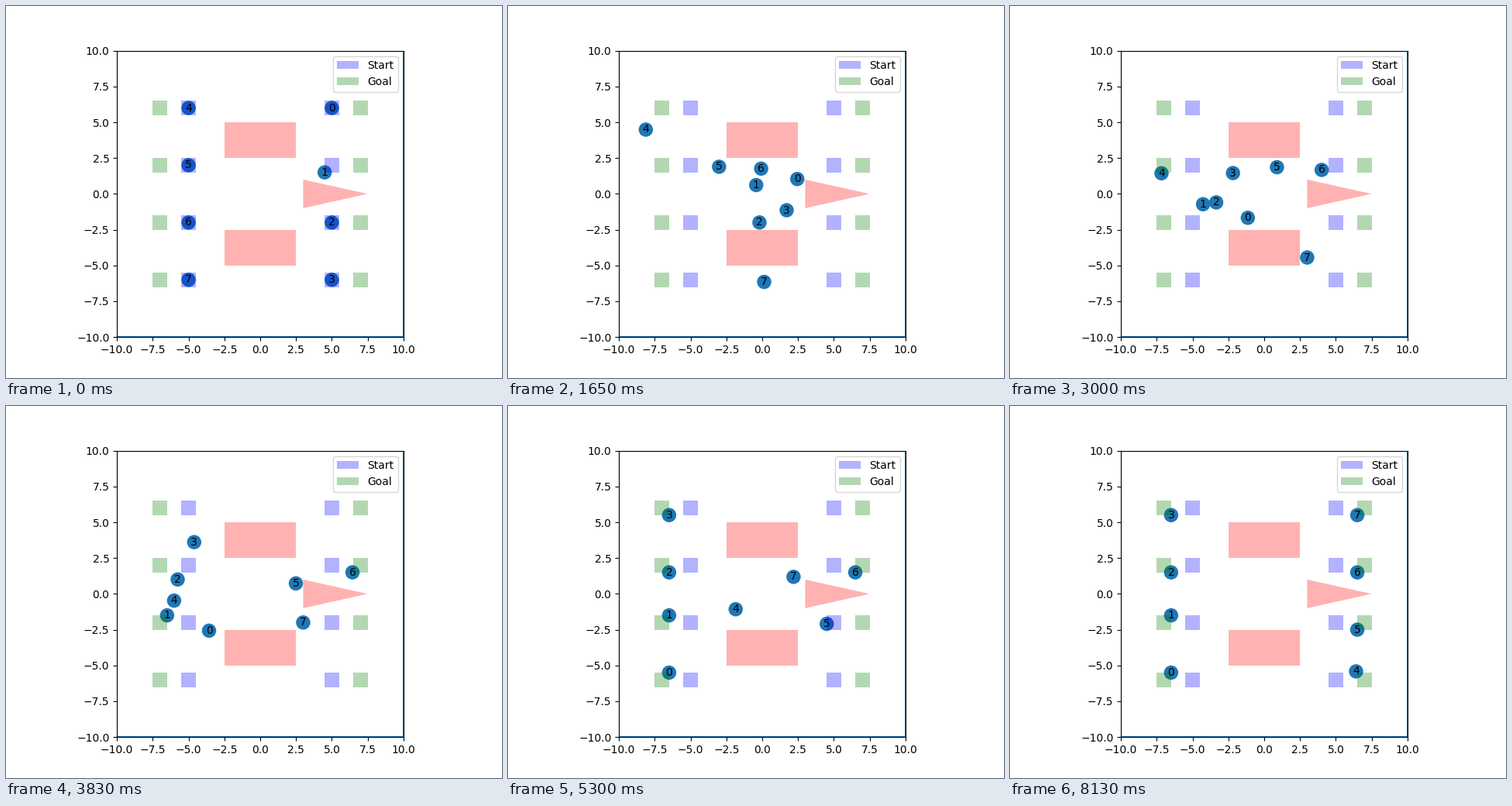
Write a matplotlib script that moves like this. It is 640x480 px and loops after 8.16 s.

```python
import numpy as np
import matplotlib.pyplot as plt
from matplotlib.animation import FuncAnimation
from matplotlib.patches import Circle, Polygon, Rectangle

LOOP_MS = 8160
FRAMES = 326
CRUISE = 0.0713  # units per step along the longer axis
ROWS = 6, 2, -2, -6

# Turning points between start and goal: (step, x, y).
TURNS = [
    [(66, 2.41, .96), (103, 0, -1.47), (145, -3, -2)],
    [(25, 2.4, 1.58), (66, -.49, .59)],
    [(66, -.27, -2), (120, -3.41, -.57)],
    [(10, 5.97, -4.9), (33, 4.01, -2.68), (130.4, -3, 2)],
    [(73, -8.51, 4.3), (149, -6.3, -.43), (275, 2.74, -1.74),
     (276, 2.74, -1.74), (296.6, 4.47, -3.46)],
    [(66, -2.98, 1.89), (138, 2.28, 1.85), (153, 2.49, .73),
     (183, 2.51, -1.69)],
    [(66, 0, 1.82), (120, 4.09, 1.67)],
    [(8.5, -3.98, -7.08), (104.3, 3, -5.5), (153, 3, -2),
     (187.6, .52, -.48)],
]
STARTS = [(x, y) for x in (5, -5) for y in ROWS]
STARTS[1] = 4.5, 1.5
GOALS = [(-6.5, y) for y in (-5.5, -1.5, 1.5, 5.5)]
GOALS += [(6.5, y) for y in (-5.5, -2.5, 1.5, 5.5)]


def make_path(start, turns, goal):
    """Steps, xs and ys of a path; the last leg runs at cruise speed."""
    t, x, y = turns[-1]
    arrival = t + max(abs(goal[0] - x), abs(goal[1] - y)) / CRUISE
    return np.array([(0, *start), *turns, (arrival, *goal)]).T


paths = [make_path(*parts) for parts in zip(STARTS, TURNS, GOALS)]

fig, ax = plt.subplots(figsize=(6.4, 4.8), dpi=100)
ax.set_aspect("equal")
ax.plot([-10, 10, 10, -10, -10], [-10, -10, 10, 10, -10], color="C0")
ax.set(xlim=(-10, 10), ylim=(-10, 10))


def tint(patch, color, label=None):
    patch.set(facecolor=color, edgecolor="none", alpha=0.3, label=label)
    return ax.add_patch(patch)


def squares(x, color, label):
    """Unit squares at (+-x, y) in every row."""
    for side in (-x, x):
        for y in ROWS:
            mark = tint(Rectangle((side - .5, y - .5), 1, 1), color, label)
    return mark


for y in (2.5, -5):
    tint(Rectangle((-2.5, y), 5, 2.5), "red")
tint(Polygon([(3, 1), (3, -1), (7.5, 0)]), "red")
marks = [squares(5, "blue", "Start"), squares(7, "green", "Goal")]
ax.legend(handles=marks, loc="upper right")

discs = [ax.add_patch(Circle((0, 0), 0.5, facecolor="C0", edgecolor="none",
                             zorder=0.5)) for _ in paths]
names = [ax.text(0, 0, str(i), ha="center", va="center")
         for i in range(len(paths))]


def update(step):
    for (t, xs, ys), disc, name in zip(paths, discs, names):
        pos = np.interp(step, t, xs), np.interp(step, t, ys)
        disc.center = pos
        name.set_position(pos)
    return discs + names


anim = FuncAnimation(fig, update, frames=FRAMES, interval=LOOP_MS / FRAMES,
                     repeat=True, repeat_delay=0)
plt.show()
```
